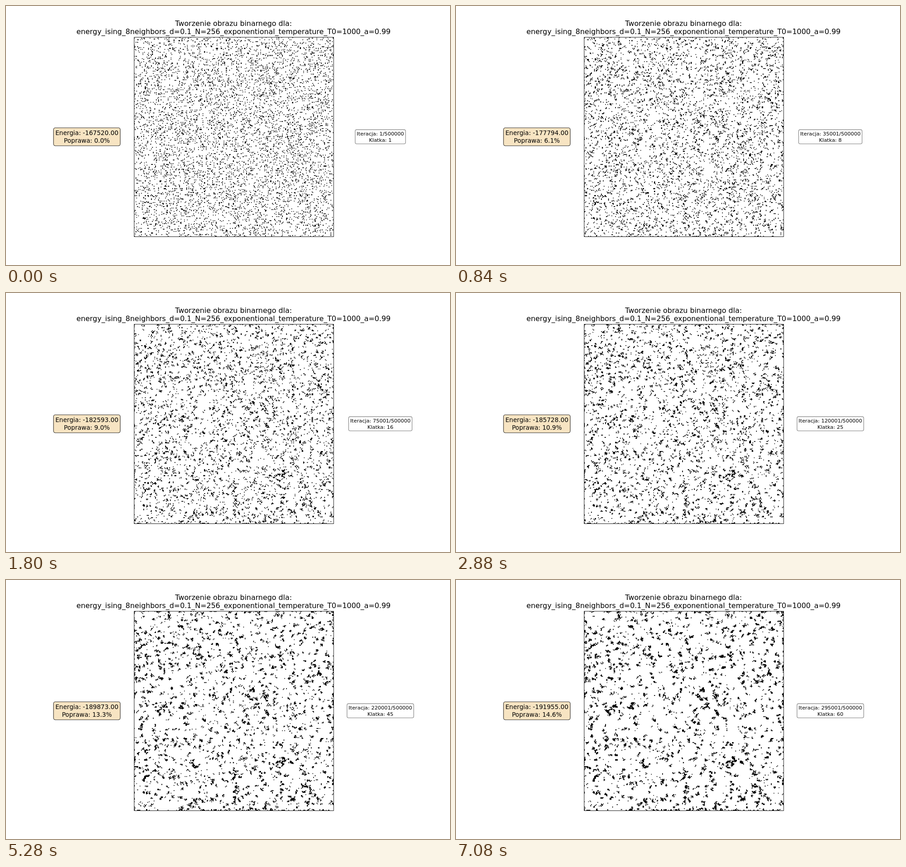
Animation of 980 by 572 pixels, one loop 7200 ms. Source, as an HTML page with a canvas:

```html
<!DOCTYPE html>
<html lang="pl">
<head>
<meta charset="utf-8">
<style>
  html, body { margin: 0; width: 980px; height: 572px; overflow: hidden; background: #fff; }
  canvas { display: block; }
</style>
</head>
<body>
<canvas id="stage" width="980" height="572"></canvas>
<script>
const ctx = document.getElementById('stage').getContext('2d');
const N = 256, ROW = N + 2;           // lattice with an empty rim
const FRAMES = 60, STEP_MS = 120, SWAPS = 5000;
const PT = 980 / 864;                 // pixels per typographic point

let seed = 20240;
function random() {
  seed = (seed + 0x6D2B79F5) | 0;
  let t = Math.imul(seed ^ (seed >>> 15), 1 | seed);
  t = (t + Math.imul(t ^ (t >>> 7), 61 | t)) ^ t;
  return ((t ^ (t >>> 14)) >>> 0) / 4294967296;
}

const randomCell = () =>
  (1 + Math.floor(random() * N)) * ROW + 1 + Math.floor(random() * N);

function startLattice() {
  const spins = new Int8Array(ROW * ROW);
  for (let y = 1; y <= N; y++) spins.fill(1, y * ROW + 1, y * ROW + 1 + N);
  for (let left = Math.floor(N * N * 0.1); left > 0;) {
    const cell = randomCell();
    if (spins[cell] === 1) { spins[cell] = -1; left--; }
  }
  return spins;
}

function neighbourSum(s, i) {
  return s[i - ROW - 1] + s[i - ROW] + s[i - ROW + 1] + s[i - 1] + s[i + 1] +
         s[i + ROW - 1] + s[i + ROW] + s[i + ROW + 1];
}

// Annealing by exchanging pairs of cells, so the black share stays constant.
function anneal() {
  const spins = startLattice(), states = [spins.slice()];
  let temperature = 1000;
  while (states.length < FRAMES) {
    for (let n = 0; n < SWAPS; n++) {
      temperature = Math.max(temperature * 0.99, 1e-6);
      const a = randomCell(), b = randomCell();
      if (spins[a] === spins[b]) continue;
      const change = 2 * (spins[a] * neighbourSum(spins, a) + spins[b] * neighbourSum(spins, b));
      if (change <= 0 || random() < Math.exp(-change / temperature)) {
        spins[a] = -spins[a];
        spins[b] = -spins[b];
      }
    }
    states.push(spins.slice());
  }
  return states;
}

// The energy drop grows almost logarithmically between these readings.
const E0 = 167520;
const readings = [[0, 167520], [7, 177794], [15, 182593], [24, 185728],
                  [33, 187760], [44, 189873], [59, 191955]];
function energyAt(k) {
  const scale = v => Math.log(1 + v / 2.4);
  const j = Math.max(1, readings.findIndex(r => r[0] >= k));
  const [k0, e0] = readings[j - 1], [k1, e1] = readings[j];
  return Math.round(e0 + (e1 - e0) * (scale(k) - scale(k0)) / (scale(k1) - scale(k0)));
}

function makeCanvas(size) {
  const c = document.createElement('canvas');
  c.width = c.height = size;
  return c;
}
const cells = makeCanvas(N), plot = makeCanvas(539);
const cellCtx = cells.getContext('2d'), plotCtx = plot.getContext('2d');
const pixels = cellCtx.createImageData(N, N);
const words = new Uint32Array(pixels.data.buffer);
plotCtx.imageSmoothingEnabled = false;
ctx.imageSmoothingQuality = 'high';

function drawLattice(spins) {
  for (let i = 0; i < N * N; i++) {
    const cell = ((i >> 8) + 1) * ROW + (i & 255) + 1;
    words[i] = spins[cell] < 0 ? 0xff000000 : 0xffffffff;
  }
  cellCtx.putImageData(pixels, 0, 0);
  plotCtx.drawImage(cells, 0, 0, 539, 539);
  ctx.drawImage(plot, 282.7, 68.8, 440.2, 440.4);
  ctx.strokeStyle = '#000';
  ctx.lineWidth = 0.91;
  ctx.strokeRect(282.95, 69.05, 440.2, 440.4);
}

function setFont(points) {
  ctx.font = `${points * PT}px "DejaVu Sans", sans-serif`;
}

function drawLines(lines, x, baselines) {
  ctx.fillStyle = '#000';
  lines.forEach((line, i) => ctx.fillText(line, x, baselines[i]));
}

function drawLabel(lines, x, baselines, points, top, height, fill, edge) {
  setFont(points);
  const pad = 0.3 * points * PT;
  const width = Math.max(...lines.map(l => ctx.measureText(l).width)) + 2 * pad;
  ctx.beginPath();
  ctx.roundRect(x - width / 2, top, width, height, pad);
  ctx.fillStyle = fill;
  ctx.fill();
  ctx.strokeStyle = edge;
  ctx.lineWidth = PT;
  ctx.stroke();
  drawLines(lines, x, baselines);
}

function drawFrame(k) {
  ctx.fillStyle = '#fff';
  ctx.fillRect(0, 0, 980, 572);
  drawLattice(states[k]);

  ctx.textAlign = 'center';
  setFont(14);
  drawLines(['Tworzenie obrazu binarnego dla:',
    'energy_ising_8neighbors_d=0.1_N=256_exponentional_temperature_T0=1000_a=0.99'],
    502.2, [44, 62]);

  const energy = energyAt(k), gain = (energy / E0 - 1) * 100;
  drawLabel([`Energia: -${energy}.00`, `Poprawa: ${gain.toFixed(1)}%`],
    178.5, [285, 301.6], 12, 269, 39.7, 'rgba(245,222,179,0.8)', 'rgba(0,0,0,0.8)');
  drawLabel([`Iteracja: ${k * SWAPS + 1}/500000`, `Klatka: ${k + 1}`],
    826.3, [286, 299.5], 10, 273.1, 31.4, '#fff', 'rgba(0,0,0,0.5)');
}

const states = anneal();
const start = performance.now();
let shown = -1;
function tick() {
  const k = Math.floor((performance.now() - start) / STEP_MS) % FRAMES;
  if (k !== shown) drawFrame(shown = k);
  requestAnimationFrame(tick);
}
tick();
</script>
</body>
</html>
```
